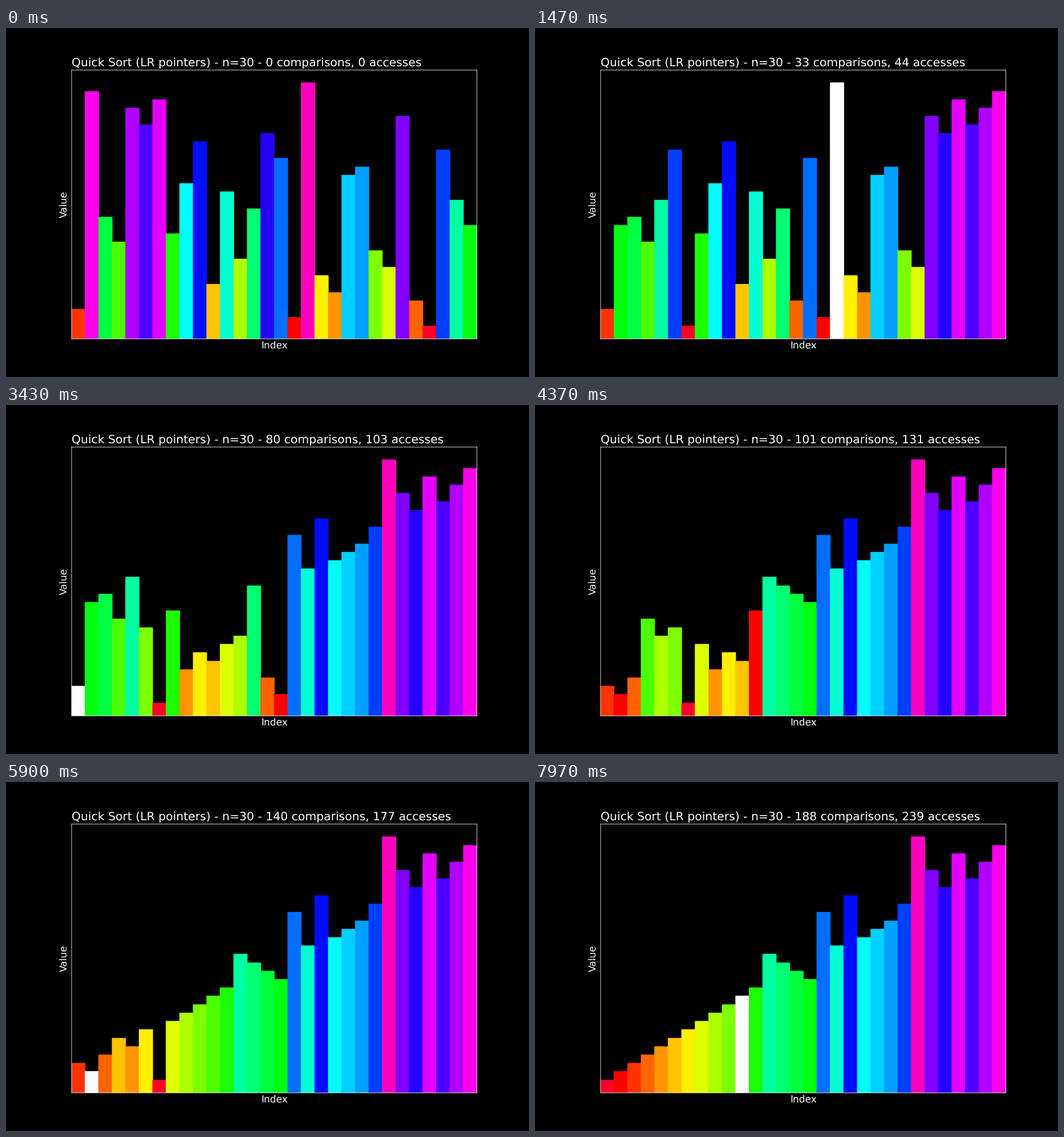
A matplotlib script that plays this animation: 917 px wide and 611 px high, repeating every 8 s.

```python
import numpy as np
import matplotlib.pyplot as plt
from matplotlib.animation import FuncAnimation

W, H, DPI = 917, 611, 64
LAYOUT_W, LAYOUT_H = 1200, 800      # design size at 100 dpi
PT = 76.4 / DPI                     # design points to points at this dpi
AXES_H = 616                        # axes height in design pixels
TICK, LOOP = 20, 8000               # ms
ORDER = [2, 28, 13, 10, 26, 24, 27, 11, 17, 22, 5, 16, 8, 14, 23,
         20, 1, 29, 6, 4, 18, 19, 9, 7, 25, 3, 0, 21, 15, 12]
N = len(ORDER)
HEIGHTS = np.round(np.linspace(50, 1000, N) / 1050 * AXES_H)
COLORS = plt.get_cmap("gist_rainbow")(np.linspace(0, 1, N))
FLASH = {"get": "white", "set": "red"}


class TrackedList:
    """A list that records every read and write."""

    def __init__(self, items):
        self.items = list(items)
        self.log = [(None, None, list(items))]

    def note(self, op, i):
        self.log.append((op, i, list(self.items)))

    def __getitem__(self, i):
        self.note("get", i)
        return self.items[i]

    def __setitem__(self, i, value):
        self.items[i] = value
        self.note("set", i)


def quick_sort(a, lo, hi):
    pivot = a[(lo + hi) // 2]
    i, j = lo, hi
    while i <= j:
        while a[i] < pivot:
            i += 1
        while a[j] > pivot:
            j -= 1
        if i <= j:
            a[i], a[j] = a[j], a[i]
            i += 1
            j -= 1
    if lo < j:
        quick_sort(a, lo, j)
    if i < hi:
        quick_sort(a, i, hi)


tracked = TrackedList(ORDER)
quick_sort(tracked, 0, N - 1)
log = tracked.log

plt.style.use("dark_background")
plt.rcParams.update({
    "font.family": "DejaVu Sans",
    "font.size": 16 * PT,
    "text.hinting": "none",
    "axes.linewidth": 0.8 * PT,
    "axes.labelpad": 4 * PT,
    "axes.titlepad": 6 * PT,
    "patch.linewidth": PT,
})

fig, ax = plt.subplots(figsize=(W / DPI, H / DPI), dpi=DPI)
# Lines sit on the centres of design pixels.
dx, dy = 0.5 / LAYOUT_W, 0.5 / LAYOUT_H
fig.subplots_adjust(left=0.125 + dx, right=0.9 + dx,
                    bottom=0.11 - dy, top=0.88 - dy)
bars = ax.bar(np.arange(N), HEIGHTS[ORDER], width=1, align="edge", snap=False)
for spine in ax.spines.values():
    spine.set_snap(False)
ax.set(xlim=(0, N), ylim=(0, AXES_H), xticks=[], yticks=[],
       xlabel="Index", ylabel="Value")
title = ax.set_title("", loc="left")


def update(frame):
    # 30 accesses per second, each starting on a rounded 10 ms mark
    step = 3 * (frame * TICK + 15) // 100
    op, index, items = log[step]
    for bar, k in zip(bars, items):
        bar.set_height(HEIGHTS[k])
        bar.set_color(COLORS[k])
    if op:
        bars[index].set_color(FLASH[op])
    reads = sum(entry[0] == "get" for entry in log[:step])
    title.set_text(f"Quick Sort (LR pointers) - n={N} - "
                   f"{reads} comparisons, {step} accesses")
    return [*bars, title]


anim = FuncAnimation(fig, update, frames=LOOP // TICK,
                     init_func=lambda: update(0),
                     interval=TICK, repeat=True, repeat_delay=0)
plt.show()
```
